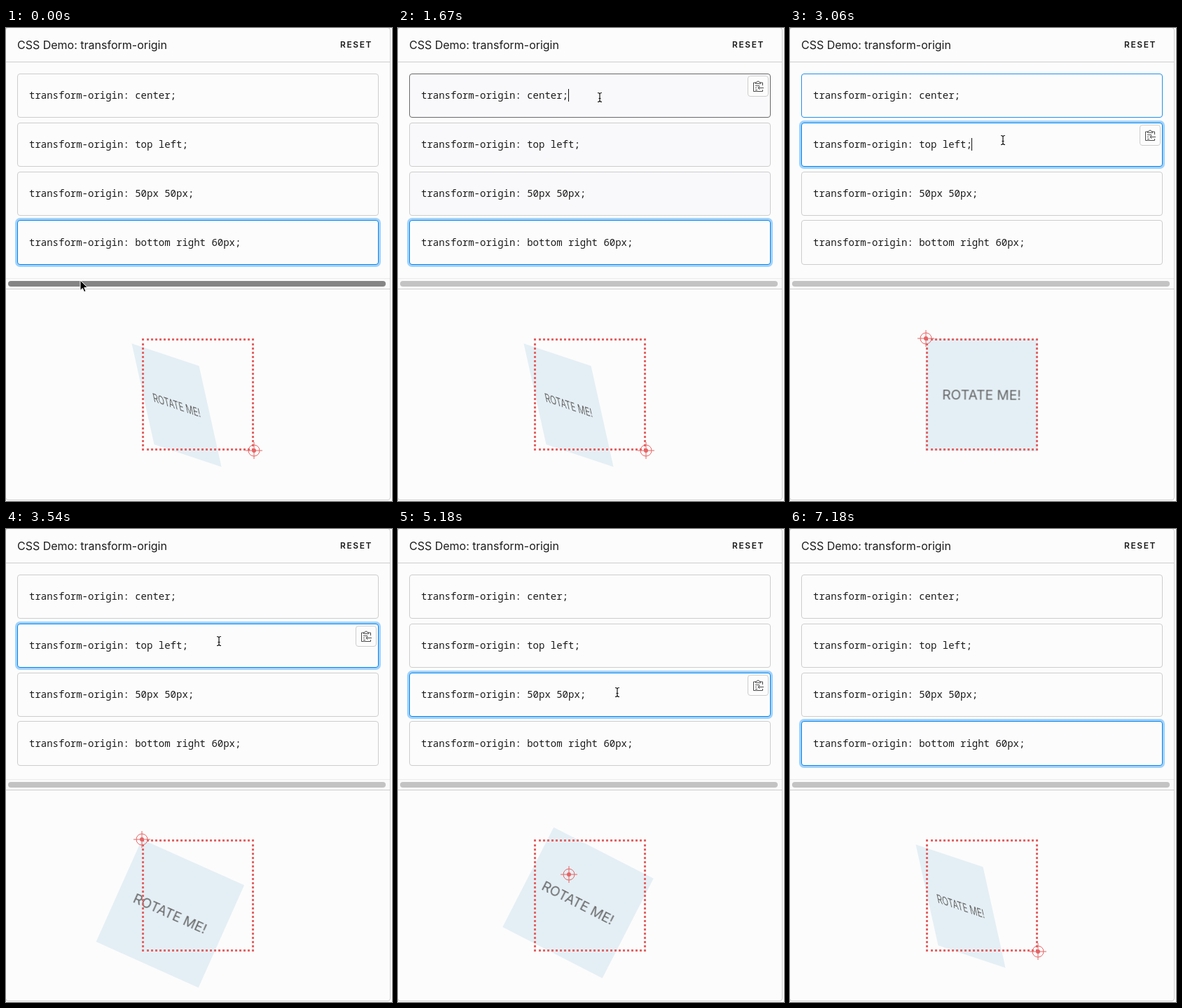
An HTML page that plays this animation: 551 px wide and 675 px high, repeating every 7420 ms.

```html
<!DOCTYPE html>
<html lang="en">
<head>
<meta charset="utf-8">
<title>transform-origin demo</title>
<style>
:root {
  --line: #cdcdcd;
  --press: #696969;
  --blue: #0085f2;
  --ring: 0 0 0 3px #a3d3fa;
  --off: 0 0 0 0 #a3d3fa;
  --red: #e66465;
}
html, body { margin: 0; width: 100%; height: 100%; overflow: hidden; background: #fff; }
#stage { position: relative; width: 551px; height: 675px; overflow: hidden; }
#stage div, #stage svg { position: absolute; box-sizing: border-box; }
svg { overflow: visible; }

#frame { left: -1px; top: -1px; width: 550px; height: 675px; border: 1px solid var(--line); border-radius: 4px; background: #fcfcfc; }
.rule { left: 0; width: 548px; height: 1px; background: var(--line); }
#track { left: 0; top: 357px; width: 548px; height: 15px; background: #fafafa; border-top: 1px solid #ececec; }
#thumb { left: 3px; top: 361px; width: 539px; height: 8px; border-radius: 4px; }

.card { left: 16px; width: 516px; height: 63px; border: 1px solid var(--line); border-radius: 4px; background: #fcfcfc; }
.title { font: 16px Inter, sans-serif; }
.reset { font: 600 12px Inter, sans-serif; letter-spacing: 1.6px; }
.code { font: 14px "Noto Sans Mono", monospace; white-space: pre; }
text { fill: #1b1b1b; }

#box { left: 194px; top: 443px; width: 160px; height: 160px; background: #e4eff5; color: #666;
  font: 19.2px/160px Inter, sans-serif; text-align: center; white-space: nowrap; }
#home { left: 194px; top: 443px; width: 160px; height: 160px; border: 3px dotted var(--red); }
#caret { left: 0; top: 0; width: 1px; height: 18px; background: #111; }
#copy { left: 499px; top: 0; width: 30px; height: 30px; border: 1px solid var(--line); border-radius: 4px; background: #fcfcfc; }
#copy svg { left: -1px; top: -1px; }
#aim, #mouse { left: 0; top: 0; }

/* One shared 7.42 s loop */
#box { animation: spin 7.42s infinite; }
#thumb { animation: thumb 7.42s linear infinite; }
#mouse { animation: move 7.42s ease-in-out infinite; }
#aim { animation: aim 7.42s step-end infinite; }
#caret { animation: caret 7.42s step-end infinite; }
#copy { animation: copy 7.42s step-end infinite; }
#arrow { animation: arrow 7.42s step-end infinite; }
#beam { animation: beam 7.42s step-end infinite; }
#c1 { top: 65px; animation: pick1 7.42s ease-out infinite, tint 7.42s step-end infinite; }
#c2 { top: 135px; animation: pick2 7.42s ease-out infinite, tint 7.42s step-end infinite; }
#c3 { top: 205px; animation: pick3 7.42s ease-out infinite, tint 7.42s step-end infinite; }
#c4 { top: 274px; height: 64px; animation: pick4 7.42s ease-out infinite; }

@keyframes spin {
  0%, 22.533% { transform: rotate3d(1, 2, 0, 60deg); transform-origin: 100% 100% 60px; }
  22.534% { transform: rotate(0deg); transform-origin: 50% 50% 0; }
  36.01%, 40.97% { transform: rotate(30deg); transform-origin: 50% 50% 0; }
  40.971% { transform: rotate(0deg); transform-origin: 0 0 0; }
  54.447%, 61.321% { transform: rotate(30deg); transform-origin: 0 0 0; }
  61.322% { transform: rotate(0deg); transform-origin: 50px 50px 0; }
  74.798%, 78.275% { transform: rotate(30deg); transform-origin: 50px 50px 0; }
  78.276% { transform: rotate3d(1, 2, 0, 0deg); transform-origin: 100% 100% 60px; }
  91.752%, 100% { transform: rotate3d(1, 2, 0, 60deg); transform-origin: 100% 100% 60px; }
}
@keyframes aim {
  0%, 78.276% { transform: translate(354px, 603px); }
  22.534% { transform: translate(274px, 523px); }
  40.971% { transform: translate(194px, 443px); }
  61.322% { transform: translate(244px, 493px); }
}
@keyframes pick1 {
  0%, 20.75% { border-color: var(--line); box-shadow: var(--off); }
  22.1%, 22.533% { border-color: var(--press); box-shadow: var(--off); }
  22.534%, 40.97% { border-color: var(--blue); box-shadow: var(--ring); }
  40.971% { border-color: var(--blue); box-shadow: var(--off); }
  43.67%, 100% { border-color: var(--line); box-shadow: var(--off); }
}
@keyframes pick2 {
  0%, 39.62% { border-color: var(--line); box-shadow: var(--off); }
  40.97% { border-color: var(--press); box-shadow: var(--off); }
  40.971%, 61.321% { border-color: var(--blue); box-shadow: var(--ring); }
  61.322% { border-color: var(--blue); box-shadow: var(--off); }
  64.02%, 100% { border-color: var(--line); box-shadow: var(--off); }
}
@keyframes pick3 {
  0%, 59.97% { border-color: var(--line); box-shadow: var(--off); }
  61.321% { border-color: var(--press); box-shadow: var(--off); }
  61.322%, 78.275% { border-color: var(--blue); box-shadow: var(--ring); }
  78.276% { border-color: var(--blue); box-shadow: var(--off); }
  80.97%, 100% { border-color: var(--line); box-shadow: var(--off); }
}
@keyframes pick4 {
  0%, 22.533% { border-color: var(--blue); box-shadow: var(--ring); }
  22.534% { border-color: var(--blue); box-shadow: var(--off); }
  25.23%, 76.55% { border-color: var(--line); box-shadow: var(--off); }
  78.275% { border-color: var(--press); box-shadow: var(--off); }
  78.276%, 100% { border-color: var(--blue); box-shadow: var(--ring); }
}
@keyframes tint {
  0%, 22.534% { background: #fcfcfc; }
  14% { background: #f9f9fb; }
}
@keyframes thumb {
  0%, 10% { background: #858585; }
  12.5%, 100% { background: #c3c3c3; }
}
@keyframes caret {
  0%, 11.59%, 96.76%, 100% { transform: translate(335px, 297px); opacity: 0; }
  4.85%, 18.33%, 76.55%, 90.03% { transform: translate(335px, 297px); opacity: 1; }
  20.75%, 34.23% { transform: translate(243px, 87px); opacity: 1; }
  27.49% { transform: translate(243px, 87px); opacity: 0; }
  39.62%, 53.1% { transform: translate(259px, 157px); opacity: 1; }
  46.36% { transform: translate(259px, 157px); opacity: 0; }
  59.97%, 73.45% { transform: translate(268px, 227px); opacity: 1; }
  66.71% { transform: translate(268px, 227px); opacity: 0; }
  83.29% { transform: translate(335px, 297px); opacity: 0; }
}
@keyframes copy {
  0%, 85.7%, 100% { transform: translateY(277px); opacity: 0; }
  10.8%, 73.3% { transform: translateY(277px); opacity: 1; }
  12.9%, 52.3% { transform: translateY(208px); opacity: 1; }
  14.8%, 36.3% { transform: translateY(138px); opacity: 1; }
  16.5% { transform: translateY(68px); opacity: 1; }
}
@keyframes move {
  0%, 9.7% { transform: translate(106px, 360px); }
  19.27%, 33.4% { transform: translate(288px, 99px); }
  39.1%, 48.5% { transform: translate(304px, 160px); }
  56.6%, 71.2% { transform: translate(313px, 233px); }
  76.1%, 84.9% { transform: translate(324px, 327px); }
  91.7%, 94.6% { transform: translate(529px, 604px); }
  95.15%, 100% { transform: translate(541px, 658px); }
}
@keyframes arrow {
  0%, 85.7% { opacity: 1; }
  10.8%, 96.76%, 100% { opacity: 0; }
}
@keyframes beam {
  0%, 85.7%, 100% { opacity: 0; }
  10.8% { opacity: 1; }
}
</style>
</head>
<body>
<div id="stage">
  <div id="frame"></div>
  <div class="rule" style="top:48px"></div>
  <div id="track"></div>
  <div class="rule" style="top:372px"></div>
  <div id="thumb"></div>

  <div class="card" id="c1"></div>
  <div class="card" id="c2"></div>
  <div class="card" id="c3"></div>
  <div class="card" id="c4"></div>

  <svg width="551" height="675">
    <text class="title" x="16" y="30">CSS Demo: transform-origin</text>
    <text class="reset" x="477" y="28">RESET</text>
    <g class="code">
      <text x="33" y="101">transform-origin: center;</text>
      <text x="33" y="171">transform-origin: top left;</text>
      <text x="33" y="241">transform-origin: 50px 50px;</text>
      <text x="33" y="311">transform-origin: bottom right 60px;</text>
    </g>
  </svg>

  <div id="box">ROTATE ME!</div>
  <div id="home"></div>
  <svg id="aim" width="1" height="1" fill="none" stroke="#e66465">
    <circle r="8"/>
    <path d="M-12 0H12M0-12V12"/>
    <circle r="3" fill="#e66465" stroke="none"/>
  </svg>

  <div id="caret"></div>
  <div id="copy">
    <svg width="30" height="30" fill="none" stroke="#4a4a4a">
      <path d="M11 10H8.5V22.5H21.5V20M19 10h2.5v4"/>
      <path d="M11.5 11.5v-2h2a1.5 1.5 0 0 1 3 0h2v2z"/>
      <path d="M23 17.5H15m2.5-2.5L15 17.5l2.5 2.5M11 14.5h6M11 17.5h2M11 20.5h3"/>
    </svg>
  </div>
  <svg id="mouse" width="1" height="1">
    <path id="arrow" d="M0 0V14.5L3.3 11.4L5.6 16.6L8 15.5L5.7 10.5H10.4Z" fill="#000" stroke="#fff"/>
    <g id="beam" fill="none">
      <path d="M-3-6.5Q0-6.5 0-4.5Q0-6.5 3-6.5M0-5V5M-3 6.5Q0 6.5 0 4.5Q0 6.5 3 6.5M-1.5 1.5h3" stroke="#fff" stroke-width="2.4"/>
      <path d="M-3-6.5Q0-6.5 0-4.5Q0-6.5 3-6.5M0-5V5M-3 6.5Q0 6.5 0 4.5Q0 6.5 3 6.5M-1.5 1.5h3" stroke="#111" stroke-width="1.2"/>
    </g>
  </svg>
</div>
</body>
</html>
```
